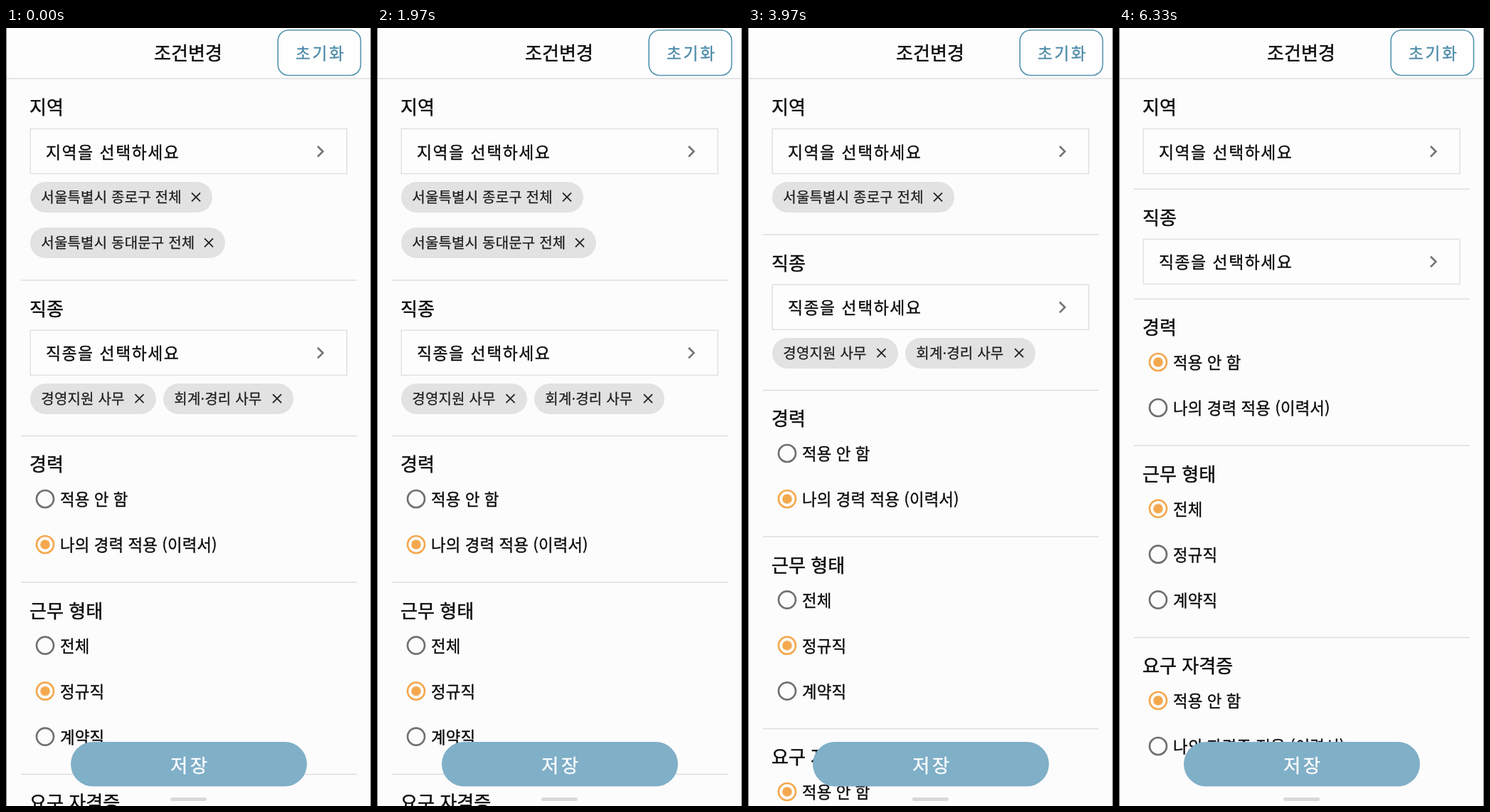
Write an HTML page that moves like this. It is 513x1092 px and loops after 6430 ms.

```html
<!DOCTYPE html>
<html lang="ko">
<head>
<meta charset="utf-8">
<title>조건변경</title>
<style>
  html, body { margin: 0; width: 100%; height: 100%; overflow: hidden; background: #fcfcfc; }
  svg { display: block; width: 100vw; height: 100vh; }

  text {
    font: 500 22.4px "Noto Sans CJK KR", "Noto Sans KR", "Noto Sans CJK", sans-serif;
    letter-spacing: .1px; fill: #0c0c0c; stroke: #0c0c0c; stroke-width: .35px;
    white-space: pre;
  }
  .head { font-size: 26.1px; letter-spacing: 0; stroke-width: .45px; }
  .pick { font-size: 22.9px; letter-spacing: 1.5px; }
  .chip text { font-size: 20px; letter-spacing: .19px; fill: #1e1e1e; stroke: #1e1e1e; stroke-width: .25px; }
  .reset { font-size: 22.67px; letter-spacing: 2.6px; fill: #4d8ba8; stroke: #4d8ba8; }
  .save { font-size: 26.5px; letter-spacing: 3.3px; fill: #fff; stroke: #fff; }

  .rule { stroke: #dedee0; stroke-width: 1.5; }
  .box { fill: #fdfdfd; stroke: #dedee2; stroke-width: 1.3; }
  .chip rect { fill: #e2e2e2; }
  .x { fill: none; stroke: #222; stroke-width: 1.9; }
  .chevron { fill: none; stroke: #757577; stroke-width: 2.7; }
  .ring { fill: none; stroke: currentColor; stroke-width: 2.67; }
  .dot { fill: currentColor; }
  .radio { color: #6f6f74; }
  .on { color: #f4a84e; }

  /* 2600 ms: one chip removed; 4600 ms: reset; 5000 ms: radio dots swap */
  .chip, .jobs, .rest, .gain, .lose { animation: 6430ms step-end infinite; }
  .early { animation-name: hide-early; }
  .late { animation-name: hide-late; }
  .jobs { animation-name: jobs; }
  .rest { animation-name: rest; }
  .gain { animation-name: gain; }
  .lose { animation-name: lose; }
  .gain .dot { animation: grow 6430ms infinite; }
  .lose .dot { animation: shrink 6430ms infinite; }

  @keyframes hide-early { 0% { visibility: visible } 40.43%, 100% { visibility: hidden } }
  @keyframes hide-late { 0% { visibility: visible } 71.53%, 100% { visibility: hidden } }
  @keyframes jobs {
    0% { transform: translateY(128px) }
    40.43% { transform: translateY(64px) }
    71.53%, 100% { transform: none }
  }
  @keyframes rest {
    0% { transform: translateY(192px) }
    40.43% { transform: translateY(128px) }
    71.53%, 100% { transform: none }
  }
  @keyframes gain { 0% { color: #6f6f74 } 71.53%, 100% { color: #f4a84e } }
  @keyframes lose { 0% { color: #f4a84e } 71.53%, 100% { color: #6f6f74 } }
  @keyframes grow { 0%, 77.76% { transform: scale(0); animation-timing-function: ease-out } 80.09%, 100% { transform: scale(1) } }
  @keyframes shrink { 0%, 77.76% { transform: scale(1); animation-timing-function: ease-in } 80.09%, 100% { transform: scale(0) } }
</style>
</head>
<body>
<svg viewBox="0 0 513 1092">
  <defs>
    <path id="x" class="x" d="M-6-6 6 6M6-6-6 6"/>
    <circle id="ring" class="ring" r="12"/>
    <g id="select">
      <rect class="box" x="34.2" width="444.8" height="63"/>
      <path class="chevron" d="M438 24.5l7.3 7.3-7.3 7.3"/>
    </g>
    <path id="rule" class="rule" d="M21 0H493"/>
  </defs>

  <rect width="513" height="1092" fill="#fcfcfc"/>

  <g>
    <text class="head" x="33" y="121">지역</text>
    <use href="#select" y="141.5"/>
    <text class="pick" x="56" y="182.5">지역을 선택하세요</text>
    <g class="chip late">
      <rect x="34" y="216" width="256" height="43" rx="21.5"/>
      <text x="49.3" y="245">서울특별시 종로구 전체</text>
      <use href="#x" x="267" y="237.3"/>
    </g>
    <g class="chip early">
      <rect x="34" y="280" width="274" height="43" rx="21.5"/>
      <text x="49.3" y="309">서울특별시 동대문구 전체</text>
      <use href="#x" x="285" y="301.3"/>
    </g>
  </g>

  <g class="jobs">
    <use href="#rule" y="226"/>
    <text class="head" x="33" y="276">직종</text>
    <use href="#select" y="296.3"/>
    <text class="pick" x="56" y="337">직종을 선택하세요</text>
    <g class="chip late">
      <rect x="34" y="371" width="177" height="43" rx="21.5"/>
      <text x="49.3" y="400">경영지원 사무</text>
      <use href="#x" x="187.5" y="392.2"/>
      <rect x="221" y="371" width="183" height="43" rx="21.5"/>
      <text x="236.3" y="400">회계·경리 사무</text>
      <use href="#x" x="381" y="392.2"/>
    </g>
  </g>

  <g class="rest">
    <use href="#rule" y="380.6"/>
    <text class="head" x="33" y="430.3">경력</text>
    <g class="radio gain" transform="translate(55 469)"><use href="#ring"/><circle class="dot" r="6.8"/></g>
    <text x="76" y="478">적용 안 함</text>
    <g class="radio lose" transform="translate(55 533)"><use href="#ring"/><circle class="dot" r="6.8"/></g>
    <text x="76" y="542">나의 경력 적용 (이력서)</text>

    <use href="#rule" y="586"/>
    <text class="head" x="33" y="636">근무 형태</text>
    <g class="radio gain" transform="translate(55 674.6)"><use href="#ring"/><circle class="dot" r="6.8"/></g>
    <text x="76" y="683.5">전체</text>
    <g class="radio lose" transform="translate(55 738.7)"><use href="#ring"/><circle class="dot" r="6.8"/></g>
    <text x="76" y="747.5">정규직</text>
    <g class="radio" transform="translate(55 802.6)"><use href="#ring"/></g>
    <text x="76" y="811.5">계약직</text>

    <use href="#rule" y="855.6"/>
    <text class="head" x="33" y="905.3">요구 자격증</text>
    <g class="radio on" transform="translate(55 944)"><use href="#ring"/><circle class="dot" r="6.8"/></g>
    <text x="76" y="953">적용 안 함</text>
    <g class="radio" transform="translate(55 1008)"><use href="#ring"/></g>
    <text x="76" y="1017">나의 자격증 적용 (이력서)</text>
  </g>

  <rect width="513" height="71" fill="#fdfdfd"/>
  <path class="rule" d="M0 71H513"/>
  <text class="head" x="208" y="45.3">조건변경</text>
  <rect x="382.2" y="3" width="116.3" height="63.5" rx="15" fill="#fefefe" stroke="#5494b0" stroke-width="1.6"/>
  <text class="reset" x="407" y="43.8">초기화</text>

  <rect x="91" y="1002" width="332" height="62.5" rx="31.2" fill="#80afc8"/>
  <text class="save" x="231" y="1044.5">저장</text>
  <rect x="231" y="1080" width="51" height="5" rx="2.5" fill="#d9d9db"/>
  <path d="M.5 0V1092M512.5 0V1092" stroke="#7c7c80"/>
</svg>
</body>
</html>
```
